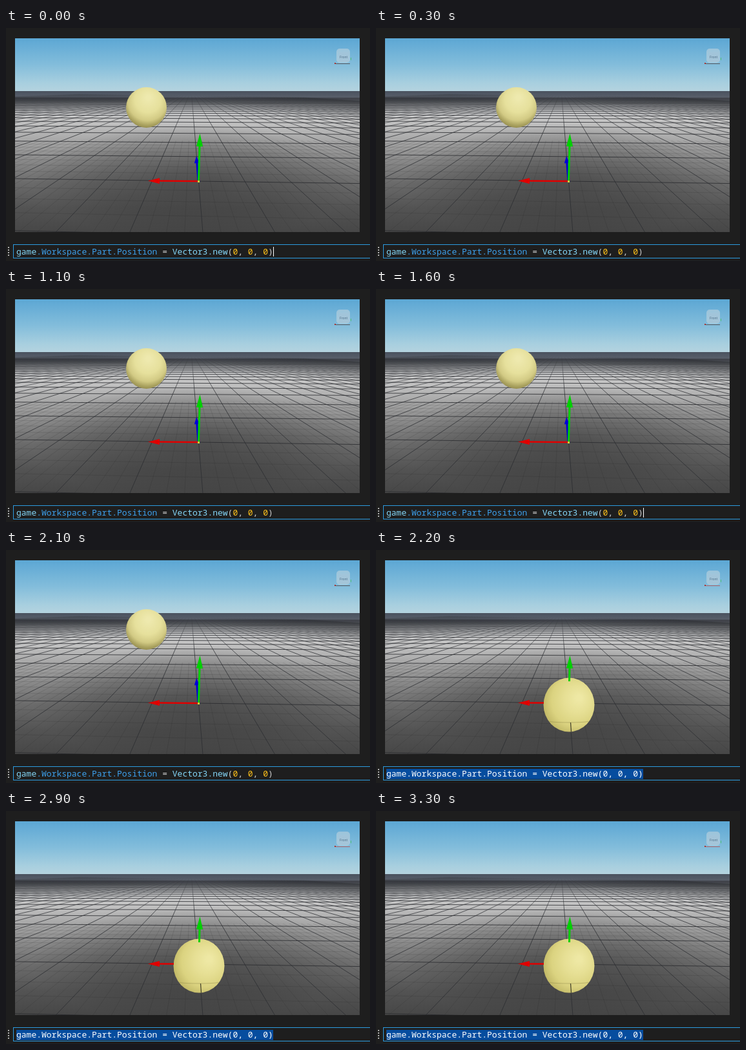
Animation, 564 px wide and 362 px high, one loop 3400 ms. Source, as an HTML page with a canvas:

```html
<!DOCTYPE html>
<html lang="en">
<head>
<meta charset="utf-8">
<title>Moving a part from the command bar</title>
<style>
html, body { margin: 0; width: 100%; height: 100%; overflow: hidden; background: #1e1e1e; }
canvas { display: block; }
</style>
</head>
<body>
<canvas id="stage" width="564" height="362"></canvas>
<script>
const g = document.getElementById('stage').getContext('2d');
const LOOP = 3400, RUN_AT = 2200;
const VIEW = [14, 16, 534, 301];
const HORIZON = 98;
const VP = { x: 287, y: 97 };        // where the depth lines meet
const ORIGIN = { x: 298.5, y: 238 };
const CELL = 72, TILT = 0.0001;

const TOKENS = [
  ['game', '#84d6f7'], ['.Workspace.Part.Position', '#3da0ec'], [' = ', '#cccccc'],
  ['Vector3.new', '#84d6f7'], ['(', '#cccccc'], ['0', '#ffc21a'], [', ', '#cccccc'],
  ['0', '#ffc21a'], [', ', '#cccccc'], ['0', '#ffc21a'], [')', '#cccccc']
];

function rect(x, y, w, h, fill) {
  g.fillStyle = fill;
  g.fillRect(x, y, w, h);
}

function shade(gradient, stops) {
  for (const [at, color] of stops) gradient.addColorStop(at, color);
  return gradient;
}

function line(x1, y1, x2, y2, color, width = 1) {
  g.strokeStyle = color;
  g.lineWidth = width;
  g.beginPath();
  g.moveTo(x1, y1);
  g.lineTo(x2, y2);
  g.stroke();
}

// Line across the floor, n cells behind the origin
function rowLine(n, color) {
  const d = 1 / (0.00709 + 0.00263 * n);
  const y = x => VP.y + d + (x - ORIGIN.x) * d * TILT;
  line(14, y(14), 548, y(548), color);
}

// Line into the distance, k cells right of the origin
function depthLine(k, color) {
  const dx = ORIGIN.x - VP.x + CELL * k;
  const dy = ORIGIN.y - VP.y + CELL * k * 141 * TILT;
  line(VP.x + dx * 0.06, VP.y + dy * 0.06, VP.x + dx * 2, VP.y + dy * 2, color);
}

function drawFloor() {
  rect(14, HORIZON, 534, 219, shade(g.createLinearGradient(0, HORIZON, 0, 317), [
    [0, '#4a525f'], [0.05, '#5a606b'], [0.075, '#83878d'], [0.1, '#b2b4b7'], [0.15, '#c8c9ca'],
    [0.22, '#c3c3c3'], [0.31, '#b0b0b0'], [0.47, '#8e8e8e'], [0.65, '#6b6b6b'],
    [0.83, '#535353'], [1, '#474747']
  ]));
  g.save();
  g.translate(290, 238);
  g.scale(1, 0.36);
  rect(-280, -260, 560, 520, shade(g.createRadialGradient(0, 0, 40, 0, 0, 250), [
    [0, 'rgba(45,45,45,.45)'], [0.5, 'rgba(45,45,45,.27)'], [1, 'rgba(45,45,45,0)']
  ]));
  g.restore();

  g.save();
  g.beginPath();
  g.rect(14, 175, 534, 142);
  g.clip();
  const fine = 'rgba(30,30,30,.13)';
  for (let i = -4; i < 8; i++) if (i % 4) rowLine(i / 4, fine);
  for (let i = -36; i < 36; i++) if (i % 4) depthLine(i / 4, fine);
  g.restore();

  for (let n = -1; n < 32; n++) rowLine(n, `rgba(40,42,46,${Math.min(0.8, 1 - n * 0.025)})`);
  const fading = shade(g.createLinearGradient(0, 106, 0, 160), [
    [0, 'rgba(40,42,46,.1)'], [0.35, 'rgba(40,42,46,.4)'], [1, 'rgba(40,42,46,.75)']
  ]);
  for (let k = -40; k <= 40; k++) depthLine(k, fading);
}

function drawBall(x, y, rx, ry, lightX, lightY, stops) {
  g.save();
  g.translate(x, y);
  g.scale(rx, ry);
  g.fillStyle = shade(g.createRadialGradient(lightX, lightY, 0.1, lightX / 2, lightY / 2, 1.3), stops);
  g.beginPath();
  g.arc(0, 0, 1, 0, 7);
  g.fill();
  g.restore();
}

function arrow(x1, y1, x2, y2, head, half, width, color) {
  const len = Math.hypot(x2 - x1, y2 - y1);
  const ux = (x2 - x1) / len, uy = (y2 - y1) / len;
  const bx = x2 - ux * head, by = y2 - uy * head;
  line(x1, y1, bx, by, color, width);
  g.fillStyle = color;
  g.beginPath();
  g.moveTo(x2, y2);
  g.lineTo(bx - uy * half, by + ux * half);
  g.lineTo(bx + uy * half, by - ux * half);
  g.fill();
}

function drawViewCube(moved) {
  g.fillStyle = 'rgba(190,210,222,.6)';
  g.beginPath();
  g.roundRect(512, 32, 21, 22, 5);
  g.fill();
  rect(516, 38, 15, 14, 'rgba(165,195,215,.5)');
  g.font = '5px Inter, sans-serif';
  g.fillStyle = '#4c6c86';
  g.fillText('Front', 517, 47);
  line(510, 55.5, 533, 55.5, moved ? '#b06468' : '#5a5a60');
  rect(509, 54, 2, 2, '#a33');
  rect(534, 46, 1, 4, '#4fbf7a');
}

function drawScene(moved) {
  g.save();
  g.beginPath();
  g.rect(...VIEW);
  g.clip();
  rect(14, 16, 534, HORIZON - 16, shade(g.createLinearGradient(0, 16, 0, HORIZON), [
    [0, '#5ca7d4'], [0.5, '#83bddb'], [0.85, '#a8cfdf'], [1, '#b4d3df']
  ]));
  drawFloor();
  drawViewCube(moved);
  if (moved) {
    drawBall(299, 240.5, 39.5, 42, 0.4, -0.25, [[0, '#eee8a4'], [0.35, '#e6df94'], [0.7, '#dbd380'], [1, '#bdb462']]);
    g.strokeStyle = 'rgba(130,122,65,.4)';
    g.lineWidth = 1;
    g.beginPath();
    g.ellipse(299, 266, 30, 2, 0, 0, Math.PI);
    g.stroke();
    line(301.5, 268, 302.5, 282, '#48452c', 1.3);
    arrow(299.5, 204, 300.5, 164, 20, 5, 3, '#00d000');
    arrow(260, 237.5, 220, 237.5, 18, 4.5, 2.5, '#e00000');
  } else {
    drawBall(217.5, 123.5, 31.5, 31.5, 0.1, -0.5, [[0, '#eee9ae'], [0.45, '#e6e09c'], [0.72, '#d2ca84'], [0.88, '#aaa25f'], [1, '#8f874c']]);
    arrow(298, 238, 295, 199, 11, 4, 3, '#0000d8');
    arrow(298.5, 238, 300.5, 164, 20, 5, 3, '#00d000');
    arrow(298.5, 238, 220, 237.5, 18, 4.5, 2.5, '#e00000');
    rect(297, 237, 3, 3, '#d8c840');
  }
  g.restore();
}

function drawCommandBar(selected, caret) {
  g.strokeStyle = '#2c9be0';
  g.lineWidth = 1;
  g.strokeRect(11.5, 336.5, 560, 21);
  for (let i = 0; i < 4; i++) rect(3, 340 + i * 4, 2, 2, '#b0b0b0');
  if (selected) rect(16, 340, 398, 16, '#064d9f');
  g.font = '13px "Noto Sans Mono", "DejaVu Sans Mono", monospace';
  let x = 16;
  for (const [text, color] of TOKENS) {
    g.fillStyle = selected ? '#ffffff' : color;
    g.fillText(text, x, 352);
    x += g.measureText(text).width;
  }
  if (caret) rect(414, 340, 1, 15, '#ffffff');
}

function frame(now) {
  const t = now % LOOP;
  const moved = t >= RUN_AT;
  const caret = !moved && Math.floor((t + 400) / 500) % 2 === 0;
  rect(0, 0, 564, 362, '#1e1e1e');
  drawScene(moved);
  drawCommandBar(moved, caret);
  requestAnimationFrame(next => frame(Math.max(0, next - start)));
}

const start = performance.now();
frame(0);
</script>
</body>
</html>
```
